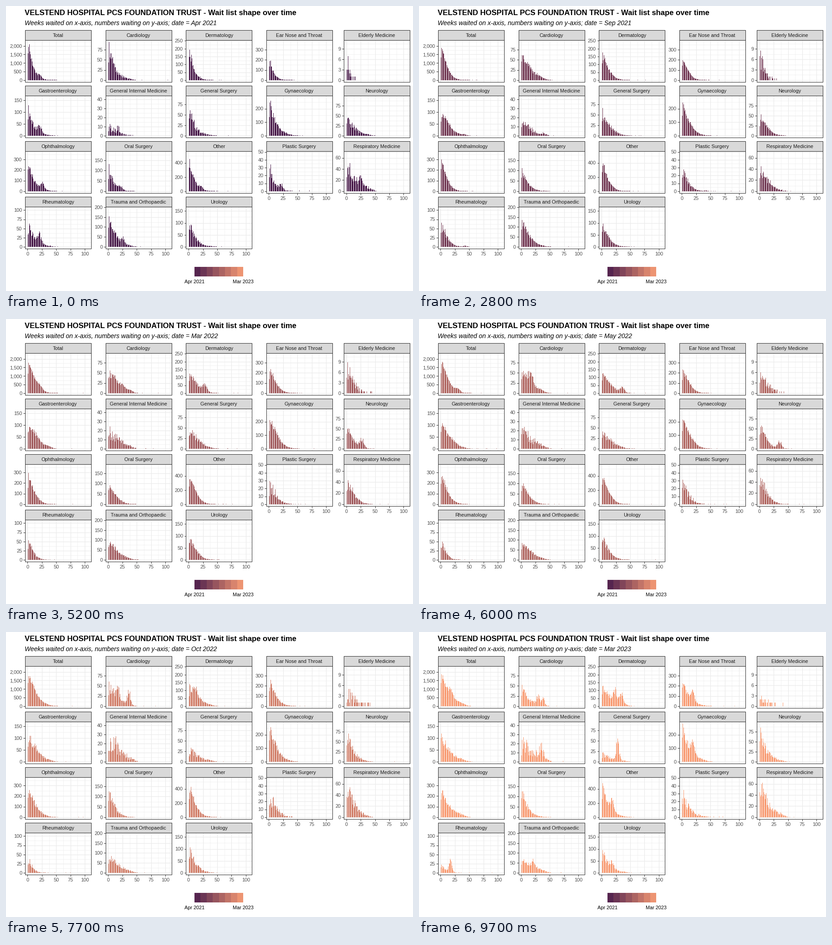
Write a matplotlib script that moves like this. It is 894x626 px and loops after 10 s.

```python
import numpy as np
import matplotlib.pyplot as plt
from matplotlib.animation import FuncAnimation
from matplotlib.collections import LineCollection, PolyCollection
from matplotlib.patches import Rectangle

W, H, DPI = 894, 626, 64
PT = 72 / DPI
plt.rcParams["font.family"] = "Liberation Sans"

LEFTS = [41.5, 218.5, 395.2, 571.6, 741.9]
TOP, PANEL_W, PANEL_H, STRIP_H, ROW_STEP = 52.5, 145, 92, 22.5, 122
X_SCALE = PANEL_W / 115.39
X_ZERO = 4.695 * X_SCALE
DARK, GRID, LABEL = "#333333", "#EBEBEB", "#4D4D4D"

WEEKS = np.arange(1, 106)
WEEKS_PER_MONTH = 4.35
MONTHS = 24
KEY_MONTHS = [0, 10, 23]
TWEENS = [5, 10, 15] + list(range(20, 100, 4))
NAMES = "Jan Feb Mar Apr May Jun Jul Aug Sep Oct Nov Dec".split()

fig = plt.figure(figsize=(W / DPI, H / DPI), dpi=DPI, facecolor="white")
ax = fig.add_axes([0, 0, 1, 1])
ax.set(xlim=(0, W), ylim=(H, 0))
ax.axis("off")

panels = []
major, minor, ticks = [], [], []


def text(x, y, s, size=10.85, **kw):
    return ax.text(x, y, s, fontsize=size * PT, va="baseline", zorder=6, **kw)


def box(x, y, w, h, fill="none"):
    ax.add_patch(Rectangle((x, y), w, h, fc=fill, ec=DARK, lw=1.05 * PT, zorder=4))


def ramp(f):
    return np.array([75, 29, 76]) / 255 * (1 - f) + np.array([248, 156, 116]) / 255 * f


def wait_curve(m, peak, width, surges):
    """Expected list shape: a decay from the peak, plus surges that age with time."""
    sharpness = 1.05 + 0.4 * np.sin(np.pi * m / (MONTHS - 1))
    rise = np.clip(0.4 + 0.3 * WEEKS, 0, 1)
    curve = peak * rise * np.exp(-(np.maximum(WEEKS - 2, 0) / width) ** sharpness)
    for born, height in surges:
        age = (m - born) * WEEKS_PER_MONTH
        strength = np.clip((age - 8) / 8, 0, 1) * np.clip((48 - age) / 14, 0, 1)
        curve += height * strength * np.exp(-((WEEKS - age) / 4) ** 2)
    return curve * np.clip((54 - WEEKS) / 14, 0, 1)


def monthly_counts(peaks, widths, surges, seed):
    """Counts per month; the variation belongs to the referral week, so it ages too."""
    rng = np.random.default_rng(seed)
    noise = min(0.9, 0.06 + 2 / np.sqrt(np.mean(peaks)))
    referrals = 1 + noise * rng.uniform(-1, 1, 250)
    counts = []
    for m in range(MONTHS):
        peak, width = (np.interp(m, KEY_MONTHS, k) for k in (peaks, widths))
        arrived = round(m * WEEKS_PER_MONTH) - WEEKS + 110
        v = wait_curve(m, peak, width, surges) * referrals[arrived]
        v = np.floor(v + rng.random(WEEKS.size))
        stray = rng.random(WEEKS.size) < 0.1 * np.exp(-(WEEKS - 45) / 16)
        counts.append(np.where(stray & (WEEKS > 45) & (peak > 15), np.maximum(v, 1), v))
    return np.array(counts)


def panel(title, ymax, step, peaks, widths, *surges):
    row, col = divmod(len(panels), 5)
    left, strip = LEFTS[col], TOP + ROW_STEP * row
    top = strip + STRIP_H
    bottom, right = top + PANEL_H, left + PANEL_W
    base = bottom - PANEL_H / 22
    scale = PANEL_H / 1.1 / ymax

    box(left, strip, PANEL_W, STRIP_H, "#D9D9D9")
    box(left, top, PANEL_W, PANEL_H)
    text(left + PANEL_W / 2, strip + 15, title, ha="center", color="#1A1A1A")

    for k in range(int(2 * 1.05 * ymax / step) + 1):
        y = base - k * step / 2 * scale
        (minor if k % 2 else major).append([(left, y), (right, y)])
        if k % 2 == 0:
            ticks.append([(left - 3.5, y), (left, y)])
            text(left - 6.3, y + 3.9, f"{k * step // 2:,}", ha="right", color=LABEL)

    lowest = row == (3 if col < 3 else 2)
    for k in range(9):
        x = left + X_ZERO + k * 12.5 * X_SCALE
        (minor if k % 2 else major).append([(x, top), (x, bottom)])
        if lowest and k % 2 == 0:
            ticks.append([(x, bottom), (x, bottom + 3.5)])
            text(x, bottom + 14.6, f"{k * 25 // 2}", ha="center", color=LABEL)

    counts = monthly_counts(peaks, widths, surges, len(panels))
    panels.append((left + X_ZERO, base, scale, np.minimum(counts, ymax)))


# title, y maximum, y step, peak and width at the key months, surges (month born, height)
panel("Total", 2221, 500, (2150, 1700, 1850), (8, 14, 16), (-5, 150), (6.5, 200), (18.8, 350))
panel("Cardiology", 94, 25, (75, 48, 45), (12, 26, 13), (9.7, 35), (14.2, 25), (16.2, 20))
panel("Dermatology", 242, 50, (190, 115, 120), (8, 17, 20), (5, 45), (15, 60), (17.5, 60))
panel("Ear Nose and Throat", 376, 100, (200, 210, 240), (7, 14, 12), (18.6, 90))
panel("Elderly Medicine", 11, 3, (6, 6, 1.3), (4, 13, 20))
panel("Gastroenterology", 162, 50, (110, 95, 115), (10, 21, 16), (-5, 30))
panel("General Internal Medicine", 42, 10, (11, 18, 20), (13, 23, 30), (-4, 4), (15, 9))
panel("General Surgery", 91, 25, (58, 42, 18), (11, 20, 20), (16.6, 38))
panel("Gynaecology", 282, 100, (235, 205, 240), (12, 16, 14), (18.6, 70))
panel("Neurology", 95, 25, (48, 45, 65), (14, 14, 13), (5.3, 26))
panel("Ophthalmology", 360, 100, (260, 270, 240), (11, 12, 17), (-6, 60))
panel("Oral Surgery", 184, 50, (105, 82, 130), (9, 16, 10), (-5, 18))
panel("Other", 537, 200, (420, 370, 430), (9, 14, 12), (-5, 30), (18.6, 150))
panel("Plastic Surgery", 48.5, 10, (26, 24, 26), (9, 14, 13), (-5, 5))
panel("Respiratory Medicine", 68.5, 20, (45, 35, 58), (20, 15, 16), (-6, 12))
panel("Rheumatology", 104, 25, (58, 52, 20), (13, 11, 7), (-5, 18), (19, 28))
panel("Trauma and Orthopaedic", 192.6, 50, (145, 90, 75), (13, 19, 23), (-6, 20), (18, 35))
panel("Urology", 160, 50, (95, 90, 85), (11, 14, 13), (18.8, 18))

for lines, color, width, z in ((minor, GRID, 0.6, 1), (major, GRID, 1.2, 1.5), (ticks, DARK, 1, 3)):
    ax.add_collection(LineCollection(lines, colors=color, linewidths=width * PT, zorder=z),
                      autolim=False)

for i in range(8):
    ax.add_patch(Rectangle((414 + 13.4 * i, 573), 13.4, 21, lw=0,
                           fc=ramp((i + 0.5) / 8), antialiased=False))
text(414, 608.7, "Apr 2021", ha="center")
text(521, 608.7, "Mar 2023", ha="center")

text(41, 20, "VELSTEND HOSPITAL PCS FOUNDATION TRUST - Wait list shape over time",
     16.6, weight="bold")
subtitle = text(41, 42.2, "", 13.89, style="italic")

bars = PolyCollection([], edgecolors="none", linewidths=0, antialiaseds=False, zorder=2)
bars.set_snap(False)
ax.add_collection(bars, autolim=False)


def bar_shapes(x0, base, scale, counts):
    """One-pixel bars on whole pixels, which leaves the regular fine gaps."""
    shown = counts > 0
    a = np.round(x0 + (WEEKS[shown] - 0.45) * X_SCALE)
    low = np.full(a.size, np.round(base))
    top = low - np.maximum(np.round(counts[shown] * scale), 1)
    return np.stack([np.stack([a, a + 1, a + 1, a], 1), np.stack([low, low, top, top], 1)], 2)


def update(n):
    nxt = sum(t <= n for t in TWEENS)
    cur = nxt - 1 if n in TWEENS else nxt
    shapes = [bar_shapes(x0, base, scale, (c[cur] + c[nxt]) / 2)
              for x0, base, scale, c in panels]
    bars.set_verts(np.concatenate(shapes))
    bars.set_facecolor(ramp((cur + nxt) / 2 / (MONTHS - 1)))
    year, month = divmod(cur + 3, 12)
    subtitle.set_text("Weeks waited on x-axis, numbers waiting on y-axis; "
                      f"date = {NAMES[month]} {2021 + year}")
    return bars, subtitle


anim = FuncAnimation(fig, update, frames=100, interval=100, repeat=True, repeat_delay=0)
plt.show()
```
